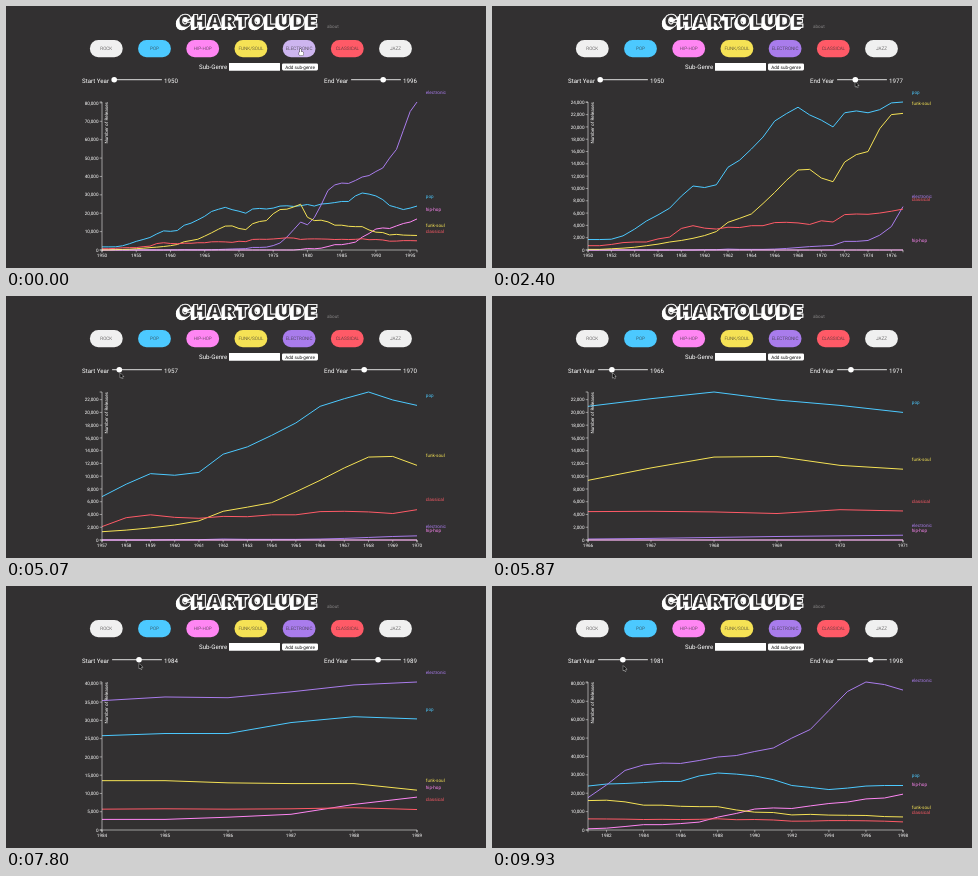
An HTML page with a canvas for the animation above (9990 ms loop, 480x262 px).

```html
<!DOCTYPE html>
<html lang="en">
<head>
<meta charset="utf-8">
<title>Chartolude</title>
<style>
  html, body { margin: 0; width: 100%; height: 100%; overflow: hidden; background: #323031; }
  canvas { display: block; width: 480px; height: 262px; }
</style>
</head>
<body>
<canvas id="stage"></canvas>
<script>
const W = 480, H = 262, LOOP = 9990, STEP = 66.6;
const BG = '#323031', FIRST = 1950, MIN_SPAN = 5, PEAK = 9130;
const LEFT = 96, RIGHT = 411, TOP = 96, BASE = 244;
const SMALL = 4.62, LARGE = 6.16;
const SANS = 'Roboto, sans-serif';

const canvas = document.getElementById('stage');
const dpr = window.devicePixelRatio || 1;
canvas.width = W * dpr;
canvas.height = H * dpr;
const ctx = canvas.getContext('2d');
ctx.scale(dpr, dpr);

// Releases per year; each list runs from its series' first year.
const pop = [
  1700, 1700, 1750, 2300, 3400, 4700, 5700, 6800, 8750, 10400,
  10150, 10600, 13450, 14600, 16400, 18350, 20950, 22150, 23200, 21950,
  21100, 20000, 22300, 22600, 22300, 22800, 23900, 24050, 23700, 24100,
  24750, 23900, 25000, 25300, 25800, 26400, 26400, 29400, 31000, 30400,
  29400, 27400, 24200, 23150, 22000, 22800, 23900, 24200, 24200];
const funk = [
  100, 100, 200, 300, 450, 700, 950, 1300, 1550, 1900,
  2350, 3000, 4500, 5150, 5850, 7550, 9350, 11300, 13000, 13100,
  11700, 11100, 14300, 15500, 16000, 19700, 22000, 22200, 23400, 24900,
  17800, 16000, 16200, 15300, 13500, 13500, 12900, 12700, 12700, 10900,
  9700, 9500, 8200, 8500, 8100, 8000, 7900, 7300, 7100];
const classical = [
  700, 700, 900, 1200, 1300, 1300, 1800, 2100, 3500, 3950,
  3550, 3400, 3700, 3650, 3950, 3950, 4450, 4500, 4400, 4150,
  4750, 4550, 5750, 5850, 5800, 6000, 6300, 6650, 6500, 5750,
  6000, 6050, 6000, 5900, 5700, 5800, 5700, 5800, 6100, 5600,
  5700, 5450, 4800, 4850, 5100, 5100, 5000, 4800, 4400];
const electronic = [
  50, 50, 150, 100, 100, 100, 150, 250, 400, 550,
  650, 750, 1400, 1400, 1550, 2400, 3800, 7050, 11100, 15200,
  13700, 17600, 24500, 32400, 35400, 36400, 36200, 37800, 39700, 40500,
  42700, 44600, 50000, 54700, 65000, 75300, 80500, 79100, 76100];
const hipHop = [
  300, 800, 650, 1000, 1900, 2900, 2900, 3500, 4300, 7000,
  9000, 11400, 12000, 11700, 13100, 14400, 15200, 16900, 17400, 19500];

const series = [
  { name: 'pop', color: '#4cc9ff', from: 1950, data: pop },
  { name: 'electronic', color: '#a97cec', from: 1960, data: electronic },
  { name: 'hip-hop', color: '#ff86f3', from: 1979, data: hipHop },
  { name: 'funk-soul', color: '#f5e255', from: 1950, data: funk },
  { name: 'classical', color: '#ff5a67', from: 1950, data: classical }
];

const pills = [
  ['ROCK', '#f0f0f0'], ['POP', '#4cc9ff'], ['HIP-HOP', '#ff86f3'],
  ['FUNK/SOUL', '#f5e255'], ['ELECTRONIC', '#a97cec'],
  ['CLASSICAL', '#ff5a67'], ['JAZZ', '#f0f0f0']
];

// Keys are [time, value, ...].
const startKeys = [[4400, 1950], [5070, 1957], [6800, 1976], [8730, 1991], [PEAK, 1993], [9930, 1981]];
const endKeys = [[400, 1996], [870, 1993], [1400, 1993], [2400, 1977], [3330, 1972], [3950, 1970]];
const cursorKeys = [
  [0, 294.5, 43.5], [70, 295, 45], [400, 377, 73], [870, 375.2, 72.6],
  [1120, 375.2, 72.6], [1130, 375.2, 73.4], [1400, 375, 73.6], [2400, 363.3, 76],
  [3330, 359.8, 76.5], [3950, 358.4, 76.5], [4350, 108.4, 76], [5070, 114.3, 77],
  [6800, 127.8, 77], [8730, 138.3, 78.5], [PEAK, 139.8, 79], [9930, 131.2, 79.8]
];

function keyed(keys, t, col = 1) {
  if (t <= keys[0][0]) return keys[0][col];
  for (let i = 1; i < keys.length; i++) {
    const a = keys[i - 1], b = keys[i];
    if (t < b[0]) return a[col] + (b[col] - a[col]) * (t - a[0]) / (b[0] - a[0]);
  }
  return keys[keys.length - 1][col];
}

const startAt = t => Math.round(keyed(startKeys, t));
// The start handle pushes the end handle ahead of it.
const endAt = t => Math.max(Math.round(keyed(endKeys, t)), startAt(Math.min(t, PEAK)) + MIN_SPAN);
const valueAt = (s, year) => s.data[year - s.from] || 0;

function tickStep(span) {
  const raw = span / 10;
  const power = 10 ** Math.floor(Math.log10(raw));
  const r = raw / power;
  return power * (r >= Math.sqrt(50) ? 10 : r >= Math.sqrt(10) ? 5 : r >= Math.sqrt(2) ? 2 : 1);
}

function text(str, x, y, { size = SMALL, color = '#fff', align = 'left', weight = 400 } = {}) {
  ctx.font = `${weight} ${size}px ${SANS}`;
  ctx.fillStyle = color;
  ctx.textAlign = align;
  ctx.fillText(str, x, y + size * 0.355);
}

function box(x, y, w, h, r, color) {
  ctx.fillStyle = color;
  ctx.beginPath();
  ctx.roundRect(x, y, w, h, r);
  ctx.fill();
}

function line(points, color, width) {
  ctx.strokeStyle = color;
  ctx.lineWidth = width;
  ctx.beginPath();
  points.forEach(([x, y]) => ctx.lineTo(x, y));
  ctx.stroke();
}

function drawTitle() {
  const name = 'CHARTOLUDE', x = 243, y = 20.8;
  ctx.save();
  ctx.font = '900 17px Inter, sans-serif';
  ctx.letterSpacing = '2.2px';
  ctx.textAlign = 'center';
  ctx.lineJoin = 'miter';
  ctx.miterLimit = 3;
  ctx.fillStyle = '#fff';
  for (let d = 3.2; d > 0.5; d -= 0.3) ctx.fillText(name, x - d, y + d);
  ctx.lineWidth = 1.5;
  ctx.strokeStyle = '#fff';
  ctx.strokeText(name, x, y);
  ctx.fillStyle = BG;
  ctx.fillText(name, x, y);
  ctx.lineWidth = 0.6;
  ctx.strokeText(name, x, y);
  ctx.restore();
}

function drawHeader(t) {
  drawTitle();
  text('about', 321, 20.2, { color: '#858384' });
  pills.forEach(([label, color], i) => {
    const x = 100.3 + i * 48.2;
    const hover = label === 'ELECTRONIC' && t < 130;
    box(x - 16.4, 34, 32.8, 17.2, 8.4, hover ? '#cdb5ef' : color);
    text(label, x, 42.5, { color: '#323031', align: 'center', weight: 300 });
  });
  text('Sub-Genre', 193, 60.5, { size: LARGE });
  box(223, 57, 51, 7.7, 0.3, '#fff');
  box(276, 57.4, 36, 7, 1.4, '#fff');
  text('Add sub-genre', 294, 60.9, { color: '#111', align: 'center' });
}

function drawSlider(label, labelX, trackX, thumbX, year) {
  text(label, labelX, 74.5, { size: LARGE });
  box(trackX, 73, 50, 1.3, 0.6, '#bdbdbd');
  ctx.fillStyle = '#fff';
  ctx.beginPath();
  ctx.arc(thumbX + (year - FIRST) * 0.73, 73.7, 2.8, 0, Math.PI * 2);
  ctx.fill();
  text(year, trackX + 52, 74.5, { size: LARGE });
}

function drawChart(start, end) {
  let max = 0;
  for (const s of series)
    for (let y = start; y <= end; y++) max = Math.max(max, valueAt(s, y));
  const px = year => LEFT + (year - start) / (end - start) * (RIGHT - LEFT);
  const py = v => BASE - v / max * (BASE - TOP);

  for (const s of series) {
    const points = [];
    for (let y = start; y <= end; y++) points.push([px(y), py(valueAt(s, y))]);
    ctx.lineJoin = 'round';
    line(points, s.color, 1);
    text(s.name, 419.8, py(valueAt(s, end)) - 9.9, { color: s.color });
  }

  const axis = '#e8e8e8';
  line([[LEFT - 2.3, TOP], [LEFT, TOP], [LEFT, BASE], [LEFT - 2.3, BASE]], axis, 0.6);
  line([[LEFT, BASE + 2.3], [LEFT, BASE], [RIGHT, BASE], [RIGHT, BASE + 2.3]], axis, 0.6);
  const dv = tickStep(max);
  for (let v = 0; v <= max; v += dv) {
    line([[LEFT - 2.3, py(v)], [LEFT, py(v)]], axis, 0.5);
    text(v.toLocaleString('en-US'), LEFT - 3.5, py(v), { align: 'right' });
  }
  const dy = Math.max(1, tickStep(end - start));
  for (let y = Math.ceil(start / dy) * dy; y <= end; y += dy) {
    line([[px(y), BASE], [px(y), BASE + 2.3]], axis, 0.5);
    text(y, px(y), 249, { align: 'center' });
  }

  ctx.save();
  ctx.translate(100, TOP);
  ctx.rotate(-Math.PI / 2);
  text('Number of Releases', 0, 0, { align: 'right' });
  ctx.restore();
}

function drawCursor(t) {
  ctx.save();
  ctx.translate(keyed(cursorKeys, t, 1), keyed(cursorKeys, t, 2));
  ctx.lineJoin = 'round';
  ctx.lineWidth = 0.7;
  ctx.strokeStyle = '#fff';
  ctx.fillStyle = '#111';
  ctx.beginPath();
  if (t < 130) {
    ctx.roundRect(-0.6, -0.4, 1.3, 4, 0.6);
    ctx.roundRect(-1.4, 2.2, 4.4, 3.8, 1.2);
    ctx.strokeStyle = '#111';
    ctx.fillStyle = '#fff';
  } else {
    [[0, 0], [0, 4.9], [1.1, 3.9], [1.9, 5.7], [2.7, 5.3], [1.9, 3.6], [3.4, 3.5]]
      .forEach(([x, y]) => ctx.lineTo(x, y));
    ctx.closePath();
  }
  ctx.stroke();
  ctx.fill();
  ctx.restore();
}

function draw(t) {
  const start = startAt(t), end = endAt(t);
  ctx.fillStyle = BG;
  ctx.fillRect(0, 0, W, H);
  ctx.textRendering = 'geometricPrecision';
  drawHeader(t);
  drawSlider('Start Year', 76, 106, 108.2, start);
  drawSlider('End Year', 318, 345, 343.6, end);
  drawChart(start, end);
  drawCursor(t);
}

const origin = performance.now();
function frame() {
  const t = (performance.now() - origin) % LOOP;
  draw(Math.floor(t / STEP) * STEP);
  requestAnimationFrame(frame);
}
frame();
</script>
</body>
</html>
```
